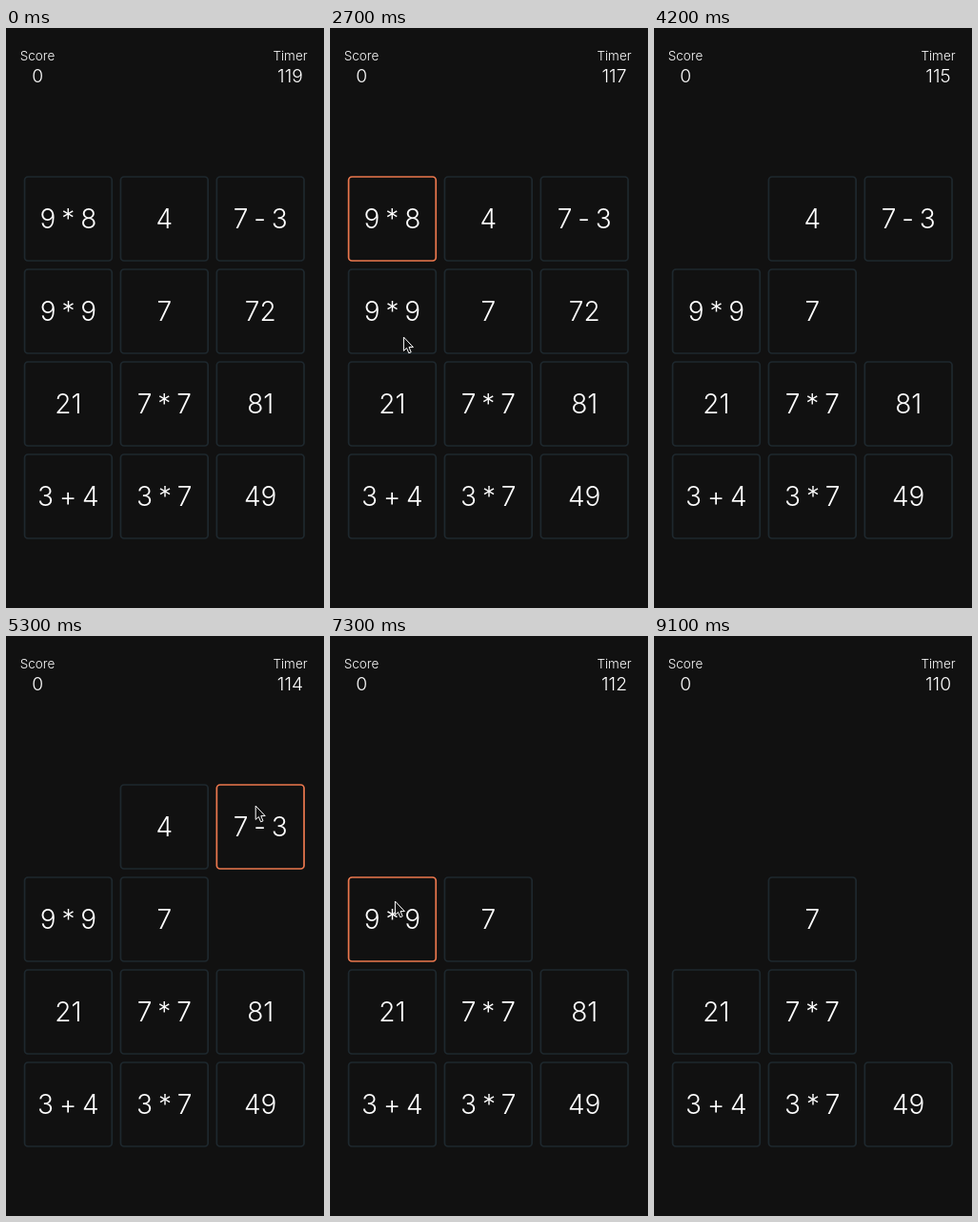
Write an HTML page that moves like this. It is 334 by 608 pixels and loops after 9400 ms.

```html
<!DOCTYPE html>
<html lang="en">
<head>
<meta charset="utf-8">
<title>Matching pairs</title>
<style>
  html, body { margin: 0; width: 100%; height: 100%; overflow: hidden; background: #111; }
  svg { display: block; width: 334px; height: 608px; }
  text {
    fill: #fff; text-anchor: middle;
    font: 300 28px Inter, "Open Sans", sans-serif;
    font-feature-settings: "calt" 0;
    word-spacing: -2px;
  }
  .label { font-size: 13.5px; }
  .value { font-size: 19.3px; }
  rect { fill: none; stroke: #1e282e; stroke-width: 1.7; }
  .selected rect { stroke: #ec784e; }
  #cursor { fill: #111; stroke: #fff; stroke-linejoin: round; }
</style>
</head>
<body>
<svg viewBox="0 0 334 608">
  <text class="label" x="33" y="34">Score</text>
  <text class="value" x="33.3" y="57">0</text>
  <text class="label" x="298.5" y="34">Timer</text>
  <text class="value" id="timer" x="298.5" y="57">119</text>
  <g id="tiles"></g>
  <path id="cursor" d="M0 0V14.4L3.2 11.5 5.4 16.8 7.8 15.8 5.6 10.6H10Z"/>
</svg>
<script>
const LOOP = 9400, STEP = 100;
const SETTLE = 200;  // the pointer rests this long before a click
const REMOVE = 300;  // a matched pair stays this long after its second click
const TILE_W = 91.7, TILE_H = 88;

const labels = ['9 * 8', '4', '7 - 3', '9 * 9', '7', '72',
                '21', '7 * 7', '81', '3 + 4', '3 * 7', '49'];
const pairs = [['9 * 8', '72'], ['7 - 3', '4'], ['9 * 9', '81']];

// dx and dy place the pointer relative to the tile's centre.
const visits = [
  { enter: 400, exit: 4200, stops: [
    { label: '9 * 8', click: 1400, pause: 500, dx: -10, dy: 0 },
    { label: '9 * 9', hover: 2700, dx: 12, dy: 27 },
    { label: '72', click: 3600 }
  ] },
  { enter: 4600, exit: 8600, stops: [
    { label: '7 - 3', click: 5300, dy: -22 },
    { label: '4', click: 6400, pause: REMOVE },
    { label: '9 * 9', click: 7300, dx: 3, dy: -19 },
    { label: '81', click: 8300 }
  ] }
];

const timer = document.getElementById('timer');
const cursor = document.getElementById('cursor');
const tiles = new Map(labels.map((label, i) => [label, makeTile(label, i)]));

function add(parent, name, attrs, text = '') {
  const node = document.createElementNS('http://www.w3.org/2000/svg', name);
  for (const key in attrs) node.setAttribute(key, attrs[key]);
  node.textContent = text;
  return parent.appendChild(node);
}

function makeTile(label, i) {
  const x = 65.4 + (i % 3) * 100.9;
  const y = 200 + Math.floor(i / 3) * 97;
  const node = add(document.getElementById('tiles'), 'g', {});
  add(node, 'rect', { x: x - TILE_W / 2, y: y - TILE_H / 2, width: TILE_W, height: TILE_H, rx: 3.5 });
  add(node, 'text', { x, y: y + 10.4 }, label);
  return { node, x, y, selected: Infinity, removed: Infinity };
}

for (const { stops } of visits) {
  for (const { label, click } of stops) if (click) tiles.get(label).selected = click;
}
for (const pair of pairs) {
  const matched = pair.map(label => tiles.get(label));
  const removed = Math.max(...matched.map(tile => tile.selected)) + REMOVE;
  for (const tile of matched) tile.removed = removed;
}

// Turns a visit into timed points, coming in and going out on the right.
function makePath({ enter, exit, stops }) {
  const points = stops.flatMap(({ label, click, hover, pause = 0, dx = -5, dy = -8 }) => {
    const tile = tiles.get(label);
    const at = { x: tile.x + dx, y: tile.y + dy };
    return click
      ? [{ time: click - SETTLE, ...at }, { time: click + pause, ...at }]
      : [{ time: hover, ...at }];
  });
  const first = points[0], last = points[points.length - 1];
  return [
    { time: enter, x: 310, y: first.y + 60 },
    ...points,
    { ...last, time: exit - REMOVE },
    { time: exit, x: 340, y: last.y }
  ];
}
const paths = visits.map(makePath);

function pointerAt(time) {
  const path = paths.find(p => time >= p[0].time && time < p[p.length - 1].time);
  if (!path) return null;
  const next = path.findIndex(point => point.time > time);
  const a = path[next - 1], b = path[next];
  const p = (time - a.time) / (b.time - a.time);
  const eased = p * p * (3 - 2 * p);
  return [a.x + (b.x - a.x) * eased, a.y + (b.y - a.y) * eased];
}

function draw(time) {
  timer.textContent = 119 - Math.floor(time / 1000);
  for (const { node, selected, removed } of tiles.values()) {
    node.classList.toggle('selected', time >= selected);
    node.style.display = time >= removed ? 'none' : '';
  }
  const pos = pointerAt(time);
  cursor.style.display = pos ? '' : 'none';
  if (pos) cursor.setAttribute('transform', `translate(${pos})`);
}

const start = performance.now();
function tick() {
  const time = (performance.now() - start) % LOOP;
  draw(Math.floor(time / STEP) * STEP);
  requestAnimationFrame(tick);
}
tick();
</script>
</body>
</html>
```
